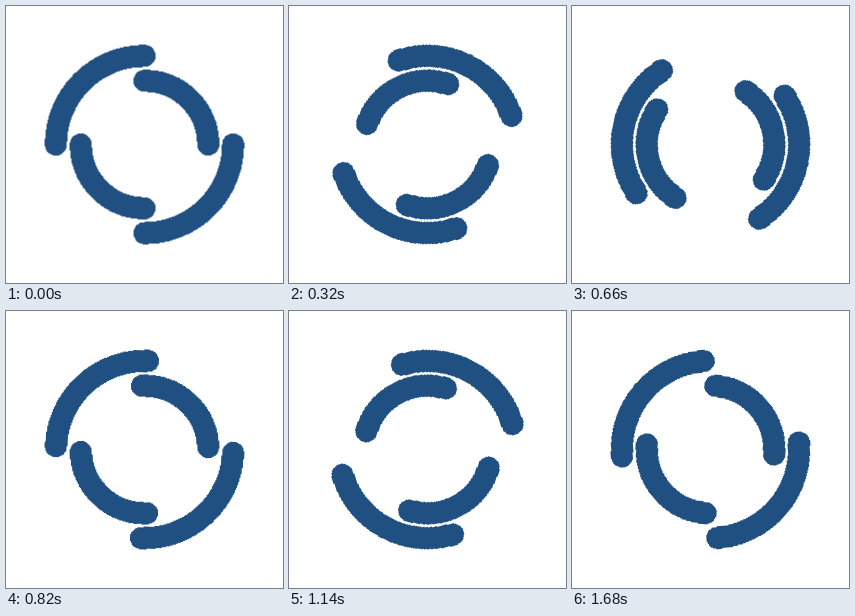
An HTML page that plays this animation: 277x277 px, repeating every 1700 ms.

```html
<!DOCTYPE html>
<html lang="en">
<head>
<meta charset="utf-8">
<title>Double ring spinner</title>
<style>
  html, body { margin: 0; width: 100%; height: 100%; overflow: hidden; background: #fff; }
  svg { display: block; width: 100vw; height: 100vh; }
  path {
    fill: none;
    stroke: #205081;
    stroke-width: 8;
    stroke-linecap: round;
    shape-rendering: crispEdges;
    transform-box: view-box;
    transform-origin: 50px 50px;
  }
</style>
</head>
<body>
<svg viewBox="0 0 100 100">
  <path id="outer" d="M18 50A32 32 0 0 1 50 18M82 50A32 32 0 0 1 50 82"/>
  <path id="inner" d="M50 27A23 23 0 0 1 73 50M50 73A23 23 0 0 1 27 50"/>
</svg>
<script>
  const LOOP = 1700;
  const STEPS = 81; // 20 ms each, except one that rests for 100 ms
  const REST = 57;
  const REST_START = 1140;
  const REST_END = 1240;

  function spin(id, direction) {
    const pose = (time, step, easing) => ({
      offset: time / LOOP,
      transform: `rotate(${direction * step * 360 / STEPS}deg)`,
      easing
    });
    document.getElementById(id).animate([
      pose(0, 0, `steps(${REST}, end)`),
      pose(REST_START, REST, "steps(1, end)"),
      pose(REST_END, REST + 1, `steps(${STEPS - REST - 1}, end)`),
      pose(LOOP, STEPS, "linear")
    ], { duration: LOOP, iterations: Infinity, delay: -1 });
  }

  spin("outer", 1);
  spin("inner", -1);
</script>
</body>
</html>
```
